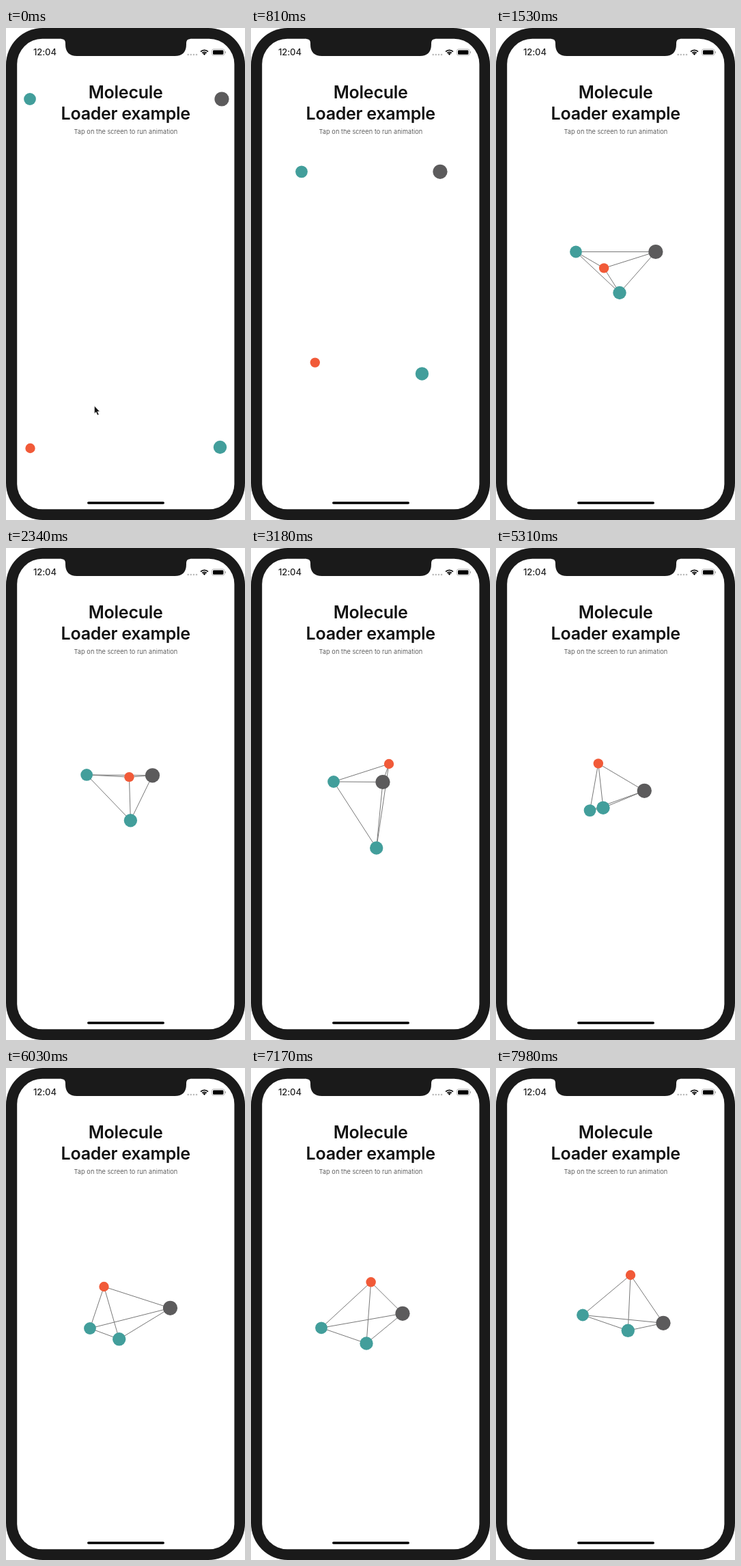
Write an HTML page with a canvas that moves like this. It is 350 px wide and 720 px high and loops after 8000 ms.

```html
<!DOCTYPE html>
<html lang="en">
<head>
<meta charset="utf-8">
<title>Molecule loader</title>
<style>
html, body { margin: 0; width: 100%; height: 100%; overflow: hidden; background: #fff; }
canvas { display: block; width: 350px; height: 720px; }
</style>
</head>
<body>
<canvas id="stage"></canvas>
<script>
const W = 350, H = 720, LOOP = 8000;
const FONT = 'Inter, "Liberation Sans", sans-serif';
const DARK = '#1a1a1a', TEAL = '#429e9b', GRAY = '#5c5b5c', ORANGE = '#f15a38';

const FLY = [240, 1420];    // corners to molecule
const BONDS = [1300, 1500]; // bonds fade in
const BEATS = [1480, 3180, 4470, 6030, 7170, 7980]; // shared turning times

// Each atom flies in from its corner, then drifts through one stop per beat.
const atoms = [
  { r: 8.9, color: TEAL, bob: 0, from: [35, 104],
    stops: [[117, 327.5], [121, 342], [148, 387.5], [123, 381], [103, 380.3], [127, 361.5]] },
  { r: 10.6, color: GRAY, bob: 0, from: [316, 104],
    stops: [[234, 327.5], [193, 342.5], [188, 360.5], [240.5, 351.3], [222, 359.3], [245, 373.3]] },
  { r: 7.2, color: ORANGE, bob: 0, from: [35.5, 615],
    stops: [[158, 351.5], [202, 316], [165.4, 309.6], [143.5, 320], [175.6, 313.3], [197, 303]] },
  { r: 9.7, color: TEAL, bob: 15, from: [313.5, 613.5],
    stops: [[181, 387.5], [183.7, 439], [148, 394], [165.7, 396.8], [169, 403], [193.3, 384.3]] }
];

const canvas = document.getElementById('stage');
const ctx = canvas.getContext('2d');
const ratio = window.devicePixelRatio || 1;
canvas.width = W * ratio;
canvas.height = H * ratio;

const clamp = v => Math.min(1, Math.max(0, v));
const smooth = v => v * v * (3 - 2 * v);
const progress = (t, [a, b]) => clamp((t - a) / (b - a));
const mix = (p, q, s) => p.map((v, k) => v + (q[k] - v) * s);

// Speed through a stop; zero at the ends and where the direction turns.
function speed(stops, i, k) {
  if (i === 0 || i === stops.length - 1) return 0;
  const rate = j => (stops[j + 1][k] - stops[j][k]) / (BEATS[j + 1] - BEATS[j]);
  const a = rate(i - 1), b = rate(i);
  return a * b > 0 ? 2 * a * b / (a + b) : 0;
}

function drift({ stops, bob }, t) {
  const next = BEATS.findIndex(b => t < b);
  if (next < 0) return stops[stops.length - 1];
  const i = next - 1, span = BEATS[next] - BEATS[i];
  const u = (t - BEATS[i]) / span;
  const [x, y] = mix(stops[i], stops[next], smooth(u)).map((v, k) => v + span * u * (1 - u) *
    (speed(stops, i, k) * (1 - u) - speed(stops, next, k) * u));
  const side = i % 2 ? 1 : -1;
  return [x, y + side * bob * Math.sin(Math.PI * u) ** 2];
}

const place = (atom, t) => t < BEATS[0]
  ? mix(atom.from, atom.stops[0], smooth(progress(t, FLY)))
  : drift(atom, t);

function box(x, y, w, h, r, color) {
  ctx.fillStyle = color;
  ctx.beginPath();
  ctx.roundRect(x, y, w, h, r);
  ctx.fill();
}

function disc(x, y, r, color) {
  ctx.fillStyle = color;
  ctx.beginPath();
  ctx.arc(x, y, r, 0, 7);
  ctx.fill();
}

function shape(path, color) {
  ctx.fillStyle = color;
  ctx.fill(new Path2D(path));
}

function label(text, x, y, font, color, spacing) {
  ctx.font = `${font} ${FONT}`;
  ctx.letterSpacing = spacing + 'px';
  ctx.textAlign = 'center';
  ctx.fillStyle = color;
  ctx.fillText(text, x + spacing / 2, y);
}

function drawPhone() {
  box(0, 0, W, H, 54, DARK);
  box(16.2, 15.8, 318.2, 688.4, 37, '#fff');
  shape('M81 15V16Q87 16 87 22V24Q87 41 104 41H247Q264 41 264 24V22Q264 16 270 16V15Z', DARK);
  box(119, 693.2, 113, 3.6, 1.8, '#000');
}

function drawStatus() {
  label('12:04', 57, 40.2, '500 13px', '#222', -0.1);
  for (let i = 0; i < 4; i++) disc(266.7 + i * 4.1, 39, 1.3, '#bbb');

  ctx.strokeStyle = '#111';
  ctx.lineWidth = 1.8;
  for (const r of [4.7, 7.7]) {
    ctx.beginPath();
    ctx.arc(290.5, 40, r, -Math.PI * 0.75, -Math.PI * 0.25);
    ctx.stroke();
  }
  shape('M290.5 40L288.3 37.6Q290.5 35.6 292.7 37.6Z', '#111');

  ctx.strokeStyle = '#aaa';
  ctx.lineWidth = 0.8;
  ctx.beginPath();
  ctx.roundRect(301.4, 30.9, 18.6, 9.2, 2.6);
  ctx.stroke();
  box(303, 32.4, 15.4, 6.3, 1.3, '#000');
  box(320.8, 34, 1.2, 3, 0.6, '#aaa');
}

function drawTitle() {
  label('Molecule', 175.3, 103.4, '600 25px', '#111', -0.25);
  label('Loader example', 175.3, 133.5, '600 25px', '#111', -0.25);
  label('Tap on the screen to run animation', 175.4, 155.4, '300 9.2px', '#333', 0.1);
}

function drawMolecule(t) {
  const spots = atoms.map(a => place(a, t));
  ctx.globalAlpha = progress(t, BONDS);
  ctx.strokeStyle = '#777';
  ctx.lineWidth = 1;
  ctx.beginPath();
  spots.forEach((p, i) => spots.slice(i + 1).forEach(q => {
    ctx.moveTo(...p);
    ctx.lineTo(...q);
  }));
  ctx.stroke();
  ctx.globalAlpha = 1;
  atoms.forEach((a, i) => disc(...spots[i], a.r, a.color));
}

function drawCursor(t) {
  if (t > 600) return;
  const arrow = 'M129.8 553.8V563.6L132 561.6L134.2 566.2L135.6 565.5L133.5 561H136.6Z';
  ctx.strokeStyle = '#e4e4e4';
  ctx.lineWidth = 1.4;
  ctx.stroke(new Path2D(arrow));
  shape(arrow, '#111');
}

function frame(t) {
  ctx.setTransform(ratio, 0, 0, ratio, 0, 0);
  ctx.clearRect(0, 0, W, H);
  drawPhone();
  drawStatus();
  drawTitle();
  drawMolecule(t);
  drawCursor(t);
}

const start = performance.now();
function tick() {
  frame((performance.now() - start) % LOOP);
  requestAnimationFrame(tick);
}
tick();
</script>
</body>
</html>
```
